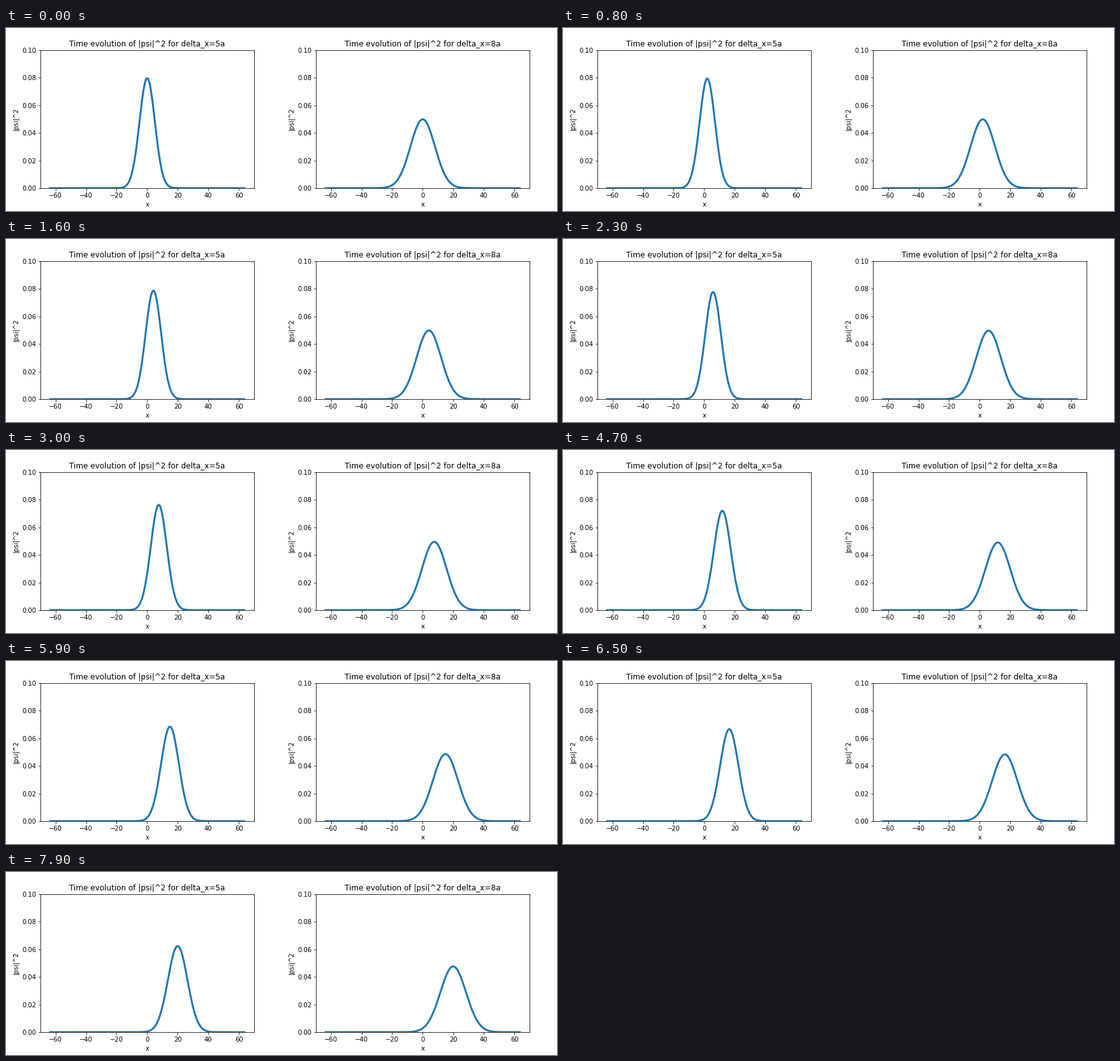
Write a matplotlib script that moves like this. It is 864 px wide and 288 px high and loops after 8000 ms.

```python
import numpy as np
import matplotlib.pyplot as plt
from matplotlib.animation import FuncAnimation

FRAMES = 80
INTERVAL = 100
K0 = 0.5                    # mean wave number, hbar = m = 1
DT = 50 / 99                # time step
WIDTHS = (5, 8)

plt.rcParams.update({"font.family": "DejaVu Sans", "font.size": 10})
x = np.arange(128) - 63.5


def density(width, t):
    """|psi|^2 of a free Gaussian wave packet."""
    sigma = width * np.hypot(1, t / (2 * width**2))
    return np.exp(-((x - K0 * t) / sigma) ** 2 / 2) / (sigma * np.sqrt(2 * np.pi))


def add_panel(fig, column, width):
    ax = fig.add_axes([column / 2 + 0.0625, 0.125, 0.3875, 0.755])
    line, = ax.plot(x, density(width, 0), color="#1f77b4", lw=3)
    ax.set_ylim(0, 0.1)
    ax.set_xlabel("x")
    ax.set_ylabel("|psi|^2")
    ax.set_title(f"Time evolution of |psi|^2 for delta_x={width}a")
    return line


fig = plt.figure(figsize=(12, 4), dpi=72, facecolor="white")
lines = [add_panel(fig, i, w) for i, w in enumerate(WIDTHS)]


def update(frame):
    for line, width in zip(lines, WIDTHS):
        line.set_ydata(density(width, frame * DT))
    return lines


anim = FuncAnimation(fig, update, frames=FRAMES, interval=INTERVAL,
                     repeat=True, repeat_delay=0, blit=False)
plt.show()
```
